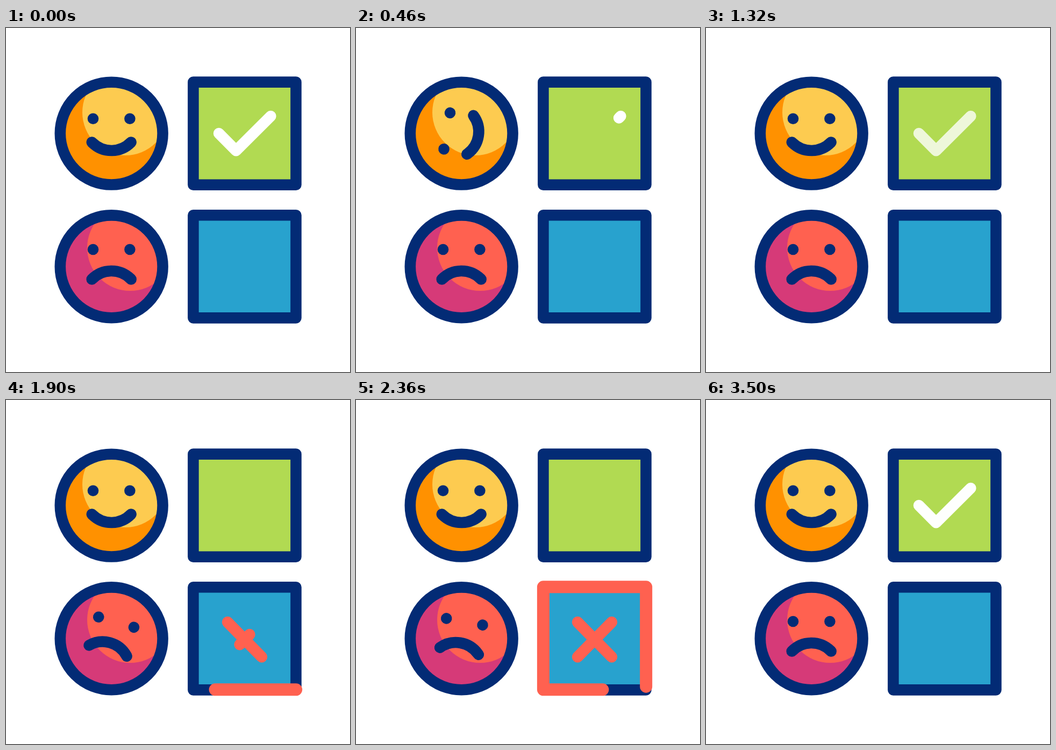
Write an HTML page with a canvas that moves like this. It is 640 px wide and 640 px high and loops after 3600 ms.

```html
<!DOCTYPE html>
<html lang="en">
<head>
<meta charset="utf-8">
<title>Yes and no</title>
<style>
html, body { margin: 0; width: 100%; height: 100%; overflow: hidden; background: #fff; }
canvas { display: block; width: 640px; height: 640px; }
</style>
</head>
<body>
<canvas id="stage"></canvas>
<script>
const LOOP = 3600;
const NAVY = '#032b75', RED = '#ff6150';
const LINE = 20.6;
const canvas = document.getElementById('stage');
const ctx = canvas.getContext('2d');
const ratio = window.devicePixelRatio || 1;
canvas.width = canvas.height = 640 * ratio;

const CHECK = [[492.5, 164], [428, 228.2], [396, 196]];
const FALLING = [[412.3, 413.3], [475.7, 478]];
const RISING = [[475.7, 413.3], [412.3, 478]];
const BORDER = [[539.7, 538.8], [348.4, 538.8], [348.4, 347.8], [539.7, 347.8], [539.7, 538.8]];

const clamp = x => Math.min(1, Math.max(0, x));
const ramp = (t, from, to) => clamp((t - from) / (to - from));
const ease = (t, from, to) => {
  const x = ramp(t, from, to);
  return x * x * (3 - 2 * x);
};

function disc(x, y, r, color) {
  ctx.fillStyle = color;
  ctx.beginPath();
  ctx.arc(x, y, r, 0, Math.PI * 2);
  ctx.fill();
}

// Stroke the part of a polyline between two fractions of its length.
function trace(points, from, to, color, width, alpha = 1) {
  if (to <= from || alpha <= 0) return;
  const lengths = points.slice(1).map((p, i) => Math.hypot(p[0] - points[i][0], p[1] - points[i][1]));
  const total = lengths.reduce((a, b) => a + b, 0);
  const start = from * total, end = to * total;
  let pos = 0, begun = false;
  ctx.beginPath();
  lengths.forEach((len, i) => {
    const a = Math.max(start, pos) - pos, b = Math.min(end, pos + len) - pos;
    if (b > a) {
      const at = d => points[i].map((v, k) => v + (points[i + 1][k] - v) * d / len);
      if (!begun) ctx.moveTo(...at(a));
      ctx.lineTo(...at(b));
      begun = true;
    }
    pos += len;
  });
  if (from === 0 && to === 1 && points[0].join() === points[points.length - 1].join()) ctx.closePath();
  ctx.globalAlpha = alpha;
  ctx.strokeStyle = color;
  ctx.lineWidth = width;
  ctx.stroke();
  ctx.globalAlpha = 1;
}

function face(cy, base, light, glow, angle, eyeY, mouthY, mouthAngle) {
  const cx = 196.2;
  disc(cx, cy, 95, base);
  ctx.save();
  ctx.beginPath();
  ctx.arc(cx, cy, 95, 0, Math.PI * 2);
  ctx.clip();
  disc(glow[0], glow[1], 80, light);
  ctx.restore();

  ctx.strokeStyle = NAVY;
  ctx.lineWidth = LINE;
  ctx.beginPath();
  ctx.arc(cx, cy, 95.4, 0, Math.PI * 2);
  ctx.stroke();

  ctx.save();
  ctx.translate(cx, cy);
  ctx.rotate(angle * Math.PI / 180);
  disc(-34.2, eyeY, 10.3, NAVY);
  disc(34.2, eyeY, 10.3, NAVY);
  ctx.beginPath();
  ctx.arc(0, mouthY, 50.7, mouthAngle - 0.803, mouthAngle + 0.803);
  ctx.stroke();
  ctx.restore();
}

function box(y, color) {
  ctx.fillStyle = color;
  ctx.strokeStyle = NAVY;
  ctx.lineWidth = LINE;
  ctx.beginPath();
  ctx.rect(348.4, y, 191.1, 191.1);
  ctx.fill();
  ctx.stroke();
}

// Head shake: swings to alternate sides, then settles.
function shake(t) {
  const poses = [0, 16.2, -16.2, 16.2, -16.2, 0];
  const step = 202, first = 1700;
  const i = Math.min(4, Math.max(0, Math.floor((t - first) / step)));
  const from = first + i * step;
  return poses[i] + (poses[i + 1] - poses[i]) * ease(t, from, from + step);
}

function drawCheck(t) {
  const length = t < 410 ? 1 - ease(t, 0, 410) : ease(t, 410, 860);
  const alpha = t < 2000 ? 1 - ramp(t, 1300, 1400) : ramp(t, 3284, 3504);
  trace(CHECK, 0, length, '#fff', 20.4, alpha);
}

function drawCross(t) {
  if (t < 1730) return;
  const alpha = 1 - ramp(t, 3284, 3500);
  const grow = (points, from, to) => {
    const half = ease(t, from, to) / 2;
    trace(points, 0.5 - half, 0.5 + half, RED, 21, alpha);
  };
  grow(FALLING, 1700, 1880);
  grow(RISING, 1837, 2017);
  trace(BORDER, ease(t, 2220, 2919), ease(t, 1704, 2396), RED, 23);
}

function draw(t) {
  ctx.setTransform(ratio, 0, 0, ratio, 0, 0);
  ctx.fillStyle = '#fff';
  ctx.fillRect(0, 0, 640, 640);
  ctx.lineCap = ctx.lineJoin = 'round';
  face(196.1, '#ff9100', '#fdcb50', [222, 157], 360 * ease(t, 0, 664), -27.3, -18.8, Math.PI / 2);
  face(443.8, '#d63a78', RED, [231, 409], shake(t), -31.8, 58.9, -Math.PI / 2);
  box(100.6, '#b1da52');
  box(348.3, '#28a2ce');
  drawCheck(t);
  drawCross(t);
}

const began = performance.now();
function tick() {
  draw((performance.now() - began) % LOOP);
  requestAnimationFrame(tick);
}
tick();
</script>
</body>
</html>
```
